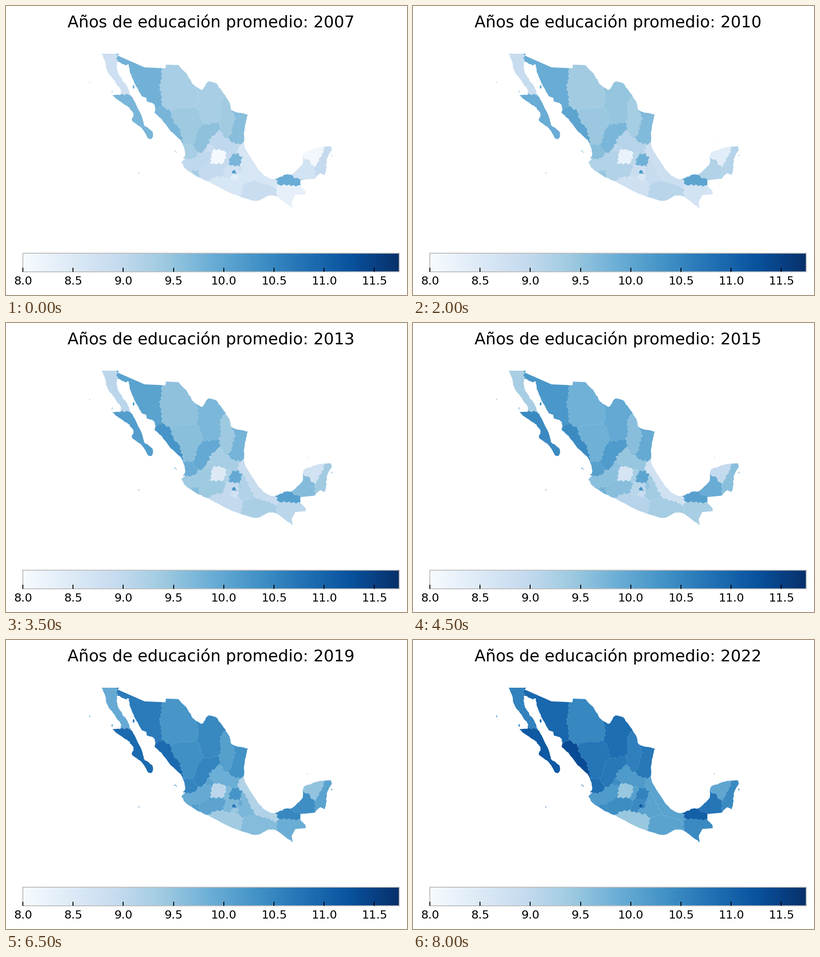
A matplotlib script that plays this animation: 880x636 px, repeating every 8500 ms.

```python
import matplotlib.pyplot as plt
import numpy as np
from matplotlib.animation import FuncAnimation
from matplotlib.patches import PathPatch, Rectangle
from matplotlib.path import Path

W, H, DPI = 880, 636, 100
PT = 72 / DPI  # points per pixel
FIRST, KEY_YEARS = 2007, [2007, 2012, 2017, 2022]
LOW, HIGH = 8.0, 11.745
BLUES = plt.get_cmap("Blues")
rng = np.random.default_rng(4)

plt.rcParams["font.family"] = "DejaVu Sans"
fig = plt.figure(figsize=(W / DPI, H / DPI), dpi=DPI, facecolor="white")
ax = fig.add_axes([0, 0, 1, 1])
ax.axis("off")


def pairs(flat):
    return np.array(flat, float).reshape(-1, 2)


def coast(*flat, n=6, bend=0.4, rough=0.5):
    """Smooth line through key points, with a little seeded raggedness."""
    p = pairs(flat)
    q = np.vstack([p[:1], p, p[-1:]])
    t = (np.arange(n) / n)[:, None]
    out = []
    for a, b, c, d in zip(q, q[1:], q[2:], q[3:]):
        m0, m1 = bend * (c - a), bend * (d - b)
        arc = (b + t * m0 + t**2 * (3 * (c - b) - 2 * m0 - m1)
               + t**3 * (2 * (b - c) + m0 + m1))
        arc[1:] += rng.normal(0, rough, arc[1:].shape)
        out.append(arc)
    return np.vstack(out + [p[-1:]])


def oval(x, y, w, h):
    t = -np.linspace(0, 2 * np.pi, 16)
    return np.column_stack([x + w / 2 * np.cos(t), y + h / 2 * np.sin(t)])


# Outline of the country, counter to the sheet so that it cuts a hole.
ring = np.vstack([
    coast(210, 105, 217, 120, 224, 146, 240, 168, 252, 185, 251, 195),
    coast(234, 196, 246, 207, 268, 222, 280, 237, 277, 253, 297, 268, 313, 292),
    coast(318, 293, 322, 288, 320, 275, 304, 263, 299, 246, 281, 208, 272, 194,
          267, 179, 248, 151, 243, 135, 244, 123),
    coast(249, 123, 262, 130, 269, 129, 272, 146, 283, 172, 297, 197, 308, 203,
          309, 210, 322, 214, 328, 224, 327, 236, 343, 251, 358, 271, 386, 300,
          393, 328, 388, 335),
    coast(395, 336, 386, 343, 394, 358, 420, 376, 447, 388, 487, 409, 548, 429,
          574, 418, 593, 419, 628, 445),
    pairs([629, 445, 627, 431, 635, 416, 658, 414, 657, 407, 646, 396,
           646, 383, 678, 380]),
    coast(678, 380, 690, 368, 699, 372, 703, 352, 705, 335, 715, 316),
    coast(713, 309, 690, 310, 658, 320, 652, 328, 650, 349, 627, 370, 614, 371,
          587, 381, 563, 369, 542, 341, 523, 306, 524, 268, 531, 239),
    coast(531, 239, 498, 231, 490, 211, 476, 190, 459, 169, 442, 168, 431, 184,
          410, 172, 398, 152, 378, 130),
    pairs([351, 129, 350, 137, 304, 135, 245, 109, 248, 105]),
])
islands = [oval(183.5, 168, 1.8, 4.5), oval(233, 188, 3, 6),
           oval(280, 178, 4, 8), oval(371, 319.5, 3, 2.4),
           oval(374, 322, 2, 2), oval(291.5, 367.5, 2.2, 2),
           oval(661.5, 295, 2, 2), oval(715, 329, 2.5, 4)]

sheet = pairs([0, 0, W, 0, W, H, 0, H])
sea = Path.make_compound_path(*(Path(np.vstack([p, p[:1]]), closed=True)
                                for p in [sheet, ring] + islands))
ax.add_patch(PathPatch(sea, fc="white", lw=0, zorder=2))

# Land is shared out by a rule: each point belongs to the state whose spine,
# thickened by its radius, is nearest. A fine ripple makes borders jagged.
LEFT, TOP, RIGHT, BOTTOM = 180, 95, 720, 450
FINE = 2  # samples per pixel
gy, gx = np.mgrid[TOP:BOTTOM:1 / FINE, LEFT:RIGHT:1 / FINE] + 0.5 / FINE
px = gx + 1.3 * np.sin(0.62 * gy + 1.5 * np.sin(0.23 * gx))
py = gy + 1.3 * np.sin(0.57 * gx + 1.5 * np.sin(0.27 * gy))
nearest = np.full(gx.shape, 1e9)
owner = np.zeros(gx.shape, int)
schooling = []  # one row of key-year values per state


def state(name, years, radius, *spine):
    p = pairs(spine)
    for a, b in zip(p, p[1:] if len(p) > 1 else p):
        d = b - a
        t = ((px - a[0]) * d[0] + (py - a[1]) * d[1]) / max(d @ d, 1)
        t = np.clip(t, 0, 1)
        dist = np.hypot(px - a[0] - t * d[0], py - a[1] - t * d[1]) - radius
        won = dist < nearest
        nearest[won] = dist[won]
        owner[won] = len(schooling)
    schooling.append(years)


state("Baja California", [8.8, 8.95, 9.5, 10.55], 14,
      228, 115, 240, 158, 258, 180)
state("Baja California Sur", [9.75, 10, 10.75, 11.15], 14,
      258, 209, 285, 248, 312, 285)
state("Sonora", [9.8, 9.95, 10.45, 10.95], 18,
      262, 118, 312, 160, 300, 178, 325, 205)
state("Chihuahua", [9.3, 9.4, 10.1, 10.5], 18, 371, 160, 358, 203, 400, 203)
state("Sinaloa", [9.75, 10.2, 10.6, 11.35], 10, 340, 236, 358, 258, 383, 292)
state("Coahuila", [9.3, 9.6, 10.2, 10.85], 25, 450, 197, 450, 235)
state("Durango", [9.4, 9.45, 10.1, 10.75], 20, 387, 247, 410, 247, 400, 285)
state("Nayarit", [9.3, 9.8, 10.3, 10.85], 14, 398, 318, 403, 323)
state("Zacatecas", [9.55, 9.85, 10.4, 10.7], 15, 458, 270, 430, 282, 428, 305)
state("San Luis Potosí", [9, 9.2, 9.65, 10.2], 12,
      466, 283, 461, 297, 498, 313)
state("Nuevo León", [9.35, 9.3, 9.8, 10.6], 15, 480, 220, 485, 245, 481, 272)
state("Tamaulipas", [9.6, 9.7, 10.1, 10.7], 11,
      500, 222, 520, 245, 507, 270, 502, 292)
state("Veracruz", [8.6, 8.95, 8.6, 10.05], 10,
      519, 319, 541, 352, 562, 377, 587, 390)
state("Puebla", [8.6, 9.1, 9.5, 10.05], 9,
      520, 343, 526, 362, 518, 379, 531, 379)
state("Hidalgo", [9.75, 9.9, 10.1, 10.55], 13, 502, 340, 507, 340)
state("Querétaro", [8.95, 9.15, 9.4, 10.1], 6, 489, 328, 484, 341)
state("Guanajuato", [8.05, 8.4, 8.8, 9.45], 13, 462, 333, 470, 332)
state("Aguascalientes", [8.85, 9.2, 9.8, 10.4], 8, 444, 314)
state("Jalisco", [9, 9.3, 9.75, 10.2], 12, 402, 350, 425, 345, 440, 330)
state("Colima", [9.3, 9.55, 9.95, 10.4], 7, 413, 369)
state("Michoacán", [8.95, 9.3, 9.8, 10.4], 13, 440, 365, 466, 361)
state("México", [8.75, 8.9, 9.2, 10.45], 9, 488, 368, 495, 360, 504, 359)
state("Ciudad de México", [10.2, 10.25, 10.4, 11.2], 8, 500, 363)
state("Morelos", [8.4, 8.65, 9, 10.1], 7, 502, 375)
state("Tlaxcala", [8.8, 9.1, 9.8, 10.1], 8, 515, 359)
state("Guerrero", [8.6, 8.9, 9.3, 9.45], 13, 465, 390, 505, 398)
state("Oaxaca", [8.85, 9.25, 9.35, 10.05], 17, 536, 404, 576, 408)
state("Chiapas", [8.3, 8.95, 9.5, 10.45], 17, 612, 408, 640, 408)
state("Tabasco", [9.9, 10.1, 10.1, 11.05], 12, 605, 383, 638, 389)
state("Campeche", [8.7, 9.5, 10.15, 10.75], 11, 640, 371, 663, 366, 657, 350)
state("Quintana Roo", [8.95, 9.25, 9.8, 10.45], 14,
      696, 367, 700, 345, 712, 318)
state("Yucatán", [8.1, 8.6, 9.2, 10], 11, 665, 324, 686, 318, 675, 335)

# Thin pale seams where the owner changes.
seam = np.zeros(owner.shape)
seam[:, 1:] += owner[:, 1:] != owner[:, :-1]
seam[1:] += owner[1:] != owner[:-1]
seam = 0.25 * np.minimum(seam, 1)[..., None]


def land(year):
    v = np.array([np.interp(year, KEY_YEARS, s) for s in schooling])
    rgb = BLUES((v - LOW) / (HIGH - LOW))[:, :3][owner]
    rgb += seam * (1 - rgb)
    h, w = BOTTOM - TOP, RIGHT - LEFT
    return rgb.reshape(h, FINE, w, FINE, 3).mean(axis=(1, 3))


ground = ax.imshow(land(FIRST), extent=(LEFT, RIGHT, BOTTOM, TOP),
                   aspect="auto", interpolation="nearest", zorder=1)

# Colour bar
X0, X1, Y0, Y1 = 37, 862.5, 543.7, 585
ax.imshow(np.linspace(0, 1, 256)[None], cmap=BLUES, aspect="auto",
          extent=(X0, X1, Y1, Y0), interpolation="nearest", zorder=4)
ax.add_patch(Rectangle((X0, Y0), X1 - X0, Y1 - Y0, fill=False,
                       ec="#bebebe", lw=2 * PT, zorder=5))
for v in np.arange(8, 11.6, 0.5):
    x = X0 + (v - LOW) / (HIGH - LOW) * (X1 - X0)
    ax.plot([x, x], [Y1, Y1 - 8.9], color="black", lw=2 * PT,
            solid_capstyle="butt", zorder=6)
    ax.text(x, 613, f"{v:.1f}", size=25.38 * PT, ha="center", va="baseline")

title = ax.text(449.5, 47, "", size=35.53 * PT, ha="center", va="baseline")
ax.set_xlim(0, W)
ax.set_ylim(H, 0)


def draw(i):
    year = FIRST + max(0, i - 1)  # the first year stays twice as long
    title.set_text(f"Años de educación promedio: {year}")
    ground.set_data(land(year))
    return title, ground


anim = FuncAnimation(fig, draw, frames=17, interval=500, repeat=True,
                     repeat_delay=0, blit=False)
plt.show()
```
